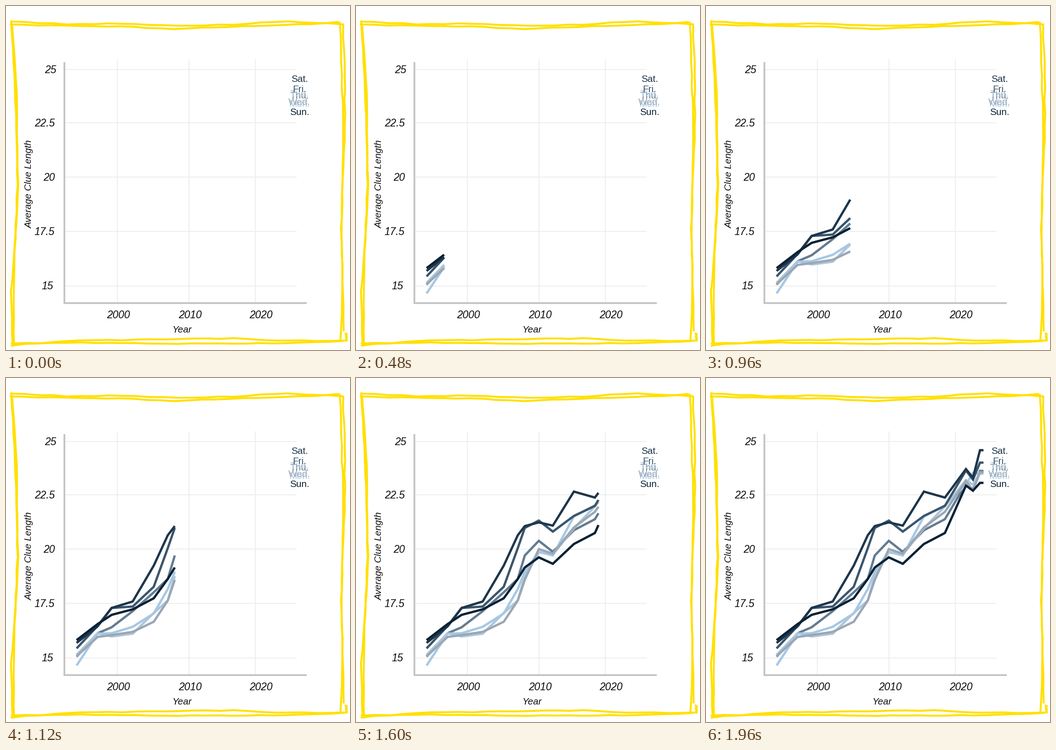
These frames come from a looping animation (748x748 px, 2 s). A matplotlib script:

```python
import matplotlib.pyplot as plt
import numpy as np
from matplotlib.animation import FuncAnimation

SIZE = 748
DPI = 100
PX = 72 / DPI  # points per pixel
FRAMES = 50
INTERVAL = 40
INK = "#0c0c0c"

rng = np.random.default_rng(4)
fig = plt.figure(figsize=(SIZE / DPI, SIZE / DPI), dpi=DPI, facecolor="white")
ax = fig.add_axes([0, 0, 1, 1])
ax.set_xlim(0, SIZE)
ax.set_ylim(SIZE, 0)
ax.axis("off")


def stroke(xs, ys, color, width, z=1, cap="butt", join="miter"):
    line, = ax.plot(xs, ys, color=color, lw=width * PX, zorder=z,
                    solid_capstyle=cap, solid_joinstyle=join)
    return line


def label(x, y, text, size, color=INK, ha="center", **style):
    ax.text(x, y, text, fontsize=size * PX, color=color, ha=ha, va="baseline",
            family="Liberation Sans", zorder=6, **style)


def marker(start, end, drift, upright=False):
    """Shaky pen stroke; drift gives its cross position at even spacing."""
    along = np.linspace(start, end, 25)
    across = np.interp(along, np.linspace(start, end, len(drift)), drift)
    across += rng.uniform(-1, 1, along.size)
    xs, ys = (across, along) if upright else (along, across)
    stroke(xs, ys, "#ffe000", 4.2, z=4, cap="round", join="round")


# hand-drawn border, two pen strokes per side
marker(12, 733, (33, 40, 38, 43, 40, 33, 40))
marker(10, 722, (40, 43, 44, 50, 45, 42, 35))
marker(12, 737, (738, 728, 726, 723.5, 723, 728, 728))
marker(12, 733, (734, 732, 733, 734.5, 734.5, 733, 728))
marker(33, 738, (12, 18, 23, 26, 21, 11, 14), upright=True)
marker(40, 738, (13, 22, 24, 25, 20, 16, 17), upright=True)
marker(36, 725, (726, 730, 733.5, 731, 730, 731, 728), upright=True)
marker(40, 706, (733, 736.5, 737, 733, 729, 732, 734), upright=True)
marker(728, 712, (737, 740), upright=True)

# grid, axes and their labels
for text, y, right in (("25", 137.5, 109), ("22.5", 254, 106.5),
                       ("20", 371.5, 106.5), ("17.5", 489.5, 105.5),
                       ("15", 608.5, 102.5)):
    stroke((129, 632), (y, y), "#eeeeee", 2)
    label(right, y + 8, text, 22.6, ha="right", style="italic")
for text, x, middle in (("2000", 242, 244), ("2010", 398, 400.5),
                        ("2020", 542.5, 554)):
    stroke((x, x), (116, 644), "#eeeeee", 2)
    label(middle, 679, text, 22.8, style="italic")
stroke((127, 127), (122, 648), "#c6c6c6", 4, z=2)
stroke((125, 654), (646, 646), "#c6c6c6", 4, z=2)
label(383, 709.5, "Year", 20.6, style="italic")
label(56.5, 388, "Average Clue Length", 20.5, style="italic",
      rotation=90, rotation_mode="anchor")

# each day: colour, label baseline, line height at the key years
KEY_YEARS = (0, 3, 5, 8, 11, 13, 14, 16, 18, 21, 24, 27, 28, 29)
DAYS = {
    "Thu": ("#637b91", 200.5, (604, 555, 542, 528, 511, 464, 437,
                               386 - 33, 378, 331, 307, 230, 242, 204)),
}
DAYS = {
    "Thu": ("#637b91", 200.5,
            (606, 555, 542, 507, 466, 437, 386, 354, 378, 331, 307, 230, 242, 202)),
    "Tue": ("#aec6da", 196.5,
            (602, 555, 562, 556, 511, 484, 431, 379, 384, 327, 279, 222, 232, 206)),
    "Mon": ("#a5c8e6", 218.5,
            (625, 556, 555, 541, 512, 459, 421, 378, 386, 301, 277, 232, 206, 208)),
    "Wed": ("#9ba7b4", 214.5,
            (605, 563, 559, 552, 530, 484, 439, 372, 382, 325, 291, 224, 244, 205)),
    "Fri": ("#3b556c", 186.5,
            (588, 539, 500, 497, 454, 370, 326, 310, 334, 300, 278, 201, 221, 184)),
    "Sat": ("#1d364b", 164.5,
            (576, 540, 500, 486, 408, 342, 322, 314, 321, 247, 260, 198, 217, 157)),
    "Sun": ("#0a2135", 236.5,
            (570, 535, 515, 503, 479, 437, 412, 390, 404, 361, 337, 234, 245, 228)),
}
X0, STEP = 153.5, 15.25
YEARS = np.arange(30)
HALVES = 59  # the lines end half a year after the last point

lines = []
for day, (color, base, heights) in DAYS.items():
    label(638, base, day + ".", 20.7, color)
    lines.append((stroke([], [], color, 5, z=3), heights))


def progress(frame):
    """Share of the lines drawn: slow start, fastest past the middle."""
    t = np.clip((frame - 6) / (FRAMES - 7), 0, 1)
    a = np.pi * t
    return t - 0.056 * np.sin(2 * a) - 0.027 * np.sin(a) + 0.008 * np.sin(3 * a)


def draw(frame):
    now = round(float(HALVES * progress(frame))) / 2
    years = np.append(YEARS[YEARS < now], now) if now else np.array([])
    for line, heights in lines:
        line.set_data(X0 + STEP * years, np.interp(years, KEY_YEARS, heights))
    return [line for line, _ in lines]


anim = FuncAnimation(fig, draw, frames=FRAMES, interval=INTERVAL,
                     init_func=lambda: draw(0), repeat=True, repeat_delay=0)
plt.show()
```
